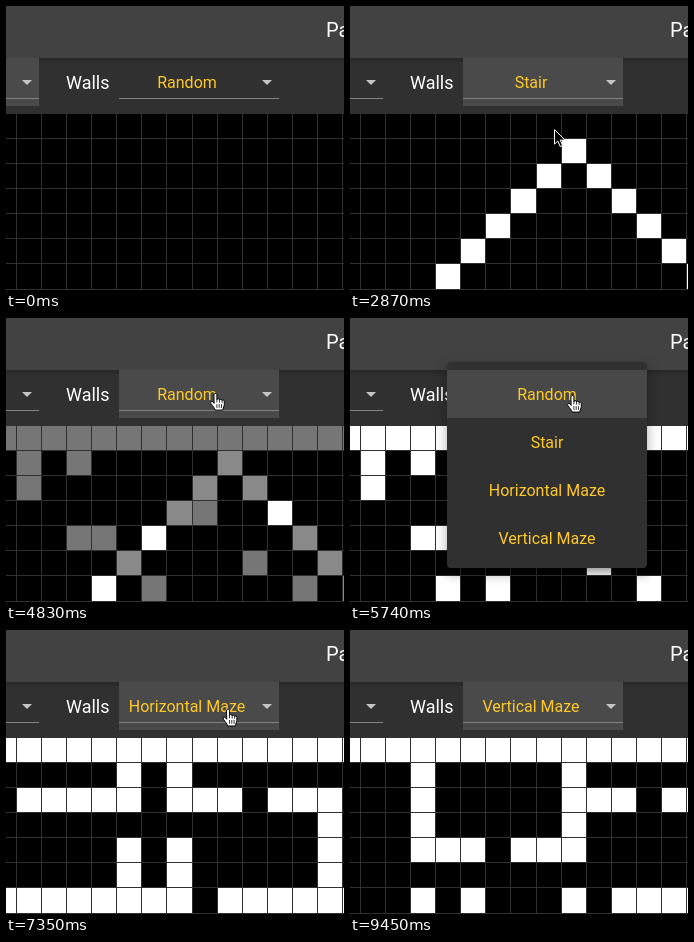
An HTML page for the animation above (9.73 s loop, 338x284 px).

```html
<!DOCTYPE html>
<html lang="en">
<head>
<meta charset="utf-8">
<title>Wall patterns</title>
<style>
  html, body { margin: 0; width: 100%; height: 100%; overflow: hidden; background: #000; }
  body { position: relative; font-family: Roboto, Arial, sans-serif; }
  svg { position: absolute; left: 0; top: 0; display: block; }
  #panel {
    position: absolute; left: 97px; width: 200px; overflow: hidden;
    background: #303030; border-radius: 4px;
    box-shadow: 0 5px 5px -3px rgba(0,0,0,.2), 0 8px 10px 1px rgba(0,0,0,.14), 0 3px 14px 2px rgba(0,0,0,.12);
  }
  #list { position: absolute; left: 0; width: 200px; }
  .option {
    position: relative; height: 48px; line-height: 50px; overflow: hidden;
    text-align: center; font-size: 16px; color: #ffca28;
  }
  #ripple { position: absolute; border-radius: 50%; background: rgba(255,255,255,.16); }
</style>
</head>
<body>
<svg width="338" height="284" viewBox="0 0 338 284">
  <defs>
    <linearGradient id="shade" x1="0" y1="0" x2="0" y2="1">
      <stop offset="0" stop-opacity=".2"/>
      <stop offset="1" stop-opacity="0"/>
    </linearGradient>
  </defs>
  <g id="cells" fill="#fff"></g>
  <g id="lines" fill="#303030"></g>
  <rect width="338" height="52" fill="#424242"/>
  <rect y="52" width="338" height="55" fill="#303030"/>
  <rect y="52" width="338" height="6" fill="url(#shade)"/>
  <rect id="leftFocus" y="52" width="33" height="48" fill="#4a4a4a"/>
  <rect id="wallFocus" x="113" y="52" width="160" height="48" fill="#4a4a4a"/>
  <path d="M0 92.5H33M113 92.5H273" stroke="#838383"/>
  <path d="M16 74h10l-5 5zM256 74h10l-5 5z" fill="#c4c4c4"/>
  <text x="320" y="31" font-size="20" fill="#fff">Path</text>
  <text x="60" y="83" font-size="18" fill="#fff">Walls</text>
  <text id="label" x="181" y="82" font-size="16" fill="#ffca28" text-anchor="middle"></text>
</svg>
<div id="panel"><div id="list"></div></div>
<svg width="338" height="284" viewBox="0 0 338 284">
  <g id="pointer" stroke="#000" stroke-linejoin="round" stroke-linecap="round">
    <g id="hand" transform="translate(1.5 .5)">
      <path fill="#fff" d="M-1.6 1.2C-1.6-.5 1.4-.5 1.4 1.2V6C1.6 4.9 4 4.9 4.1 6.4C4.5 5.4 6.5 5.6 6.6 7C7.2 6.2 8.8 6.6 8.8 8.2V11C8.8 13 7.4 14 7.4 16.6H-.4C-.6 14.6-3 12.6-4.6 9.9C-5.7 8-3.7 7.1-2.6 8.4L-1.6 9.6Z"/>
      <path fill="none" stroke-width=".8" d="M1.4 6V8.6M4.1 6.6V8.8M6.6 7.2V9M1.4 11V14M3.7 11V14M6 11V14"/>
    </g>
    <path id="arrow" fill="#000" stroke="#fff" d="M.5 .5V14.6L3.8 11.5L6.2 17L8.6 16L6.2 10.6H10.6Z"/>
  </g>
</svg>
<script>
const LOOP = 9730, STEP = 70, PITCH = 25.1, COLS = 14, ROWS = 7, PRESS = 210;

// Row 0 is the border; each rule tells whether a cell is a wall
const SCATTER = [[], [1, 3], [1], [8, 11], [3, 4, 6], [10], [4, 6, 12]];
const PATTERNS = [
  { name: 'Random', wall: (c, r) => r === 0 || SCATTER[r].includes(c) },
  { name: 'Stair', wall: (c, r) => r === 1 + Math.abs(c - 9) },
  { name: 'Horizontal Maze', wall: (c, r) => r === 0
      || r === 2 && c > 0 && (c < 3 || c % 4 !== 2)
      || r === 6 && c !== 8
      || (c === 5 || c === 7) && r !== 3
      || c === 13 && r > 1 },
  { name: 'Vertical Maze', wall: (c, r) => r === 0
      || c % 6 === 3 && r !== 5
      || r === 4 && c > 3 && c < 9 && c !== 6
      || r === 2 && c > 9 && c !== 12
      || r === 6 && (c === 5 || c > 10) }
];

// Each menu visit: way to the select, opening, arrival at the option, closing
const VISITS = [
  { leave: 210, reach: 490, open: 1400, aim: 2100, close: 2660, pick: 1, nudge: 18 },
  { leave: 3220, reach: 3500, open: 3640, aim: 4340, close: 4760, pick: 0, nudge: 0 },
  { leave: 5390, reach: 5460, open: 5460, aim: 6090, close: 6510, pick: 2, nudge: 0 },
  { leave: 6580, reach: 7420, open: 7490, aim: 8120, close: 8400, pick: 3, nudge: 0 }
];

const OUTSIDE = { x: 178, y: 290 };
const SELECT = { x: 221, y: 77 };
const optionSpot = i => ({ x: 208 - 4 * i, y: 75 + 48.5 * i });
const MOVES = VISITS.flatMap(v => [
  { from: v.leave, until: v.reach, to: SELECT },
  { from: v.open - STEP, until: v.open, to: { x: SELECT.x + v.nudge, y: SELECT.y } },
  { from: v.aim - 280, until: v.aim, to: optionSpot(v.pick) }
]).concat({ from: 9170, until: 9450, to: OUTSIDE });

const $ = id => document.getElementById(id);
const clamp = v => Math.max(0, Math.min(1, v));
const mix = (a, b, p) => a + (b - a) * p;
const smooth = p => p * p * (3 - 2 * p);
const colX = c => Math.floor(10.3 + PITCH * (c - 1));
const rowY = r => Math.floor(107.3 + PITCH * r);
const show = (el, on) => { el.style.display = on ? '' : 'none'; };

function addRect(parent, x, y, w, h) {
  const el = document.createElementNS('http://www.w3.org/2000/svg', 'rect');
  Object.entries({ x, y, width: w, height: h }).forEach(([k, v]) => el.setAttribute(k, v));
  return parent.appendChild(el);
}

const cells = [];
for (let r = 0; r < ROWS; r++) {
  for (let c = 0; c <= COLS; c++) {
    const x = colX(c), y = rowY(r);
    cells.push({
      el: addRect($('cells'), x, y, colX(c + 1) - x, rowY(r + 1) - y),
      on: PATTERNS.map(p => +p.wall(c, r))
    });
  }
}
for (let c = 1; c <= COLS; c++) addRect($('lines'), colX(c), 107, 1, 177);
for (let r = 0; r <= ROWS; r++) addRect($('lines'), 0, rowY(r), 338, 1);

const options = PATTERNS.map(({ name }) => {
  const el = document.createElement('div');
  el.className = 'option';
  el.textContent = name;
  return $('list').appendChild(el);
});
const ripple = document.createElement('div');
ripple.id = 'ripple';

function pointerAt(t) {
  return MOVES.reduce((pos, { from, until, to }) => {
    const p = smooth(clamp((t - from) / (until - from)));
    return { x: mix(pos.x, to.x, p), y: mix(pos.y, to.y, p) };
  }, OUTSIDE);
}

function drawWalls(t, done) {
  const [prev, last] = [done[done.length - 2], done[done.length - 1]];
  const p = last ? clamp((t - last.close + 25) / 205) : 0;
  for (const { el, on } of cells) {
    const from = prev ? on[prev.pick] : 0;
    el.setAttribute('fill-opacity', last ? mix(from, on[last.pick], p) : 0);
  }
}

function drawPanel(t, visit, current, pos) {
  show($('panel'), visit);
  if (!visit) return;
  const grow = 1 - (1 - clamp((t - visit.open - 70) / 280)) ** 3;
  const top = mix(54, 44, grow);
  const held = t - (visit.close - PRESS);
  const active = held >= 0 ? visit.pick : current;
  const style = $('panel').style;
  style.top = top + 'px';
  style.height = mix(48, 208, grow) + 'px';
  style.opacity = t >= visit.close ? .4 : clamp((t - visit.open + 40) / 140);
  $('list').style.top = 52 - top + 'px';
  options.forEach((el, i) => {
    el.style.background = i === active ? 'rgba(255,255,255,.115)' : 'none';
  });
  show(ripple, held >= 0);
  if (held >= 0) {
    const radius = 10 * clamp((held + 35) / 105);
    options[visit.pick].append(ripple);
    Object.assign(ripple.style, {
      left: pos.x - 97 - radius + 'px',
      top: pos.y - 52 - 48 * visit.pick - radius + 'px',
      width: 2 * radius + 'px',
      height: 2 * radius + 'px'
    });
  }
}

function drawPointer(pos, open) {
  const overSelect = pos.y > 52 && pos.y < 100;
  show($('hand'), open || overSelect);
  show($('arrow'), !open && !overSelect);
  $('pointer').setAttribute('transform', `translate(${pos.x} ${pos.y})`);
}

function draw(time) {
  const t = Math.floor(time % LOOP / STEP) * STEP;
  const done = VISITS.filter(v => t >= v.close);
  const current = done.length ? done[done.length - 1].pick : 0;
  const visit = VISITS.find(v => t >= v.open && t < v.close + STEP);
  const pos = pointerAt(t);
  show($('leftFocus'), t < VISITS[0].open);
  show($('wallFocus'), done.length > 0);
  $('label').textContent = PATTERNS[current].name;
  drawWalls(t, done);
  drawPanel(t, visit, current, pos);
  drawPointer(pos, visit && t < visit.close);
}

const start = performance.now();
function tick(now) {
  draw(Math.max(0, now - start));
  requestAnimationFrame(tick);
}
draw(0);
requestAnimationFrame(tick);
</script>
</body>
</html>
```
